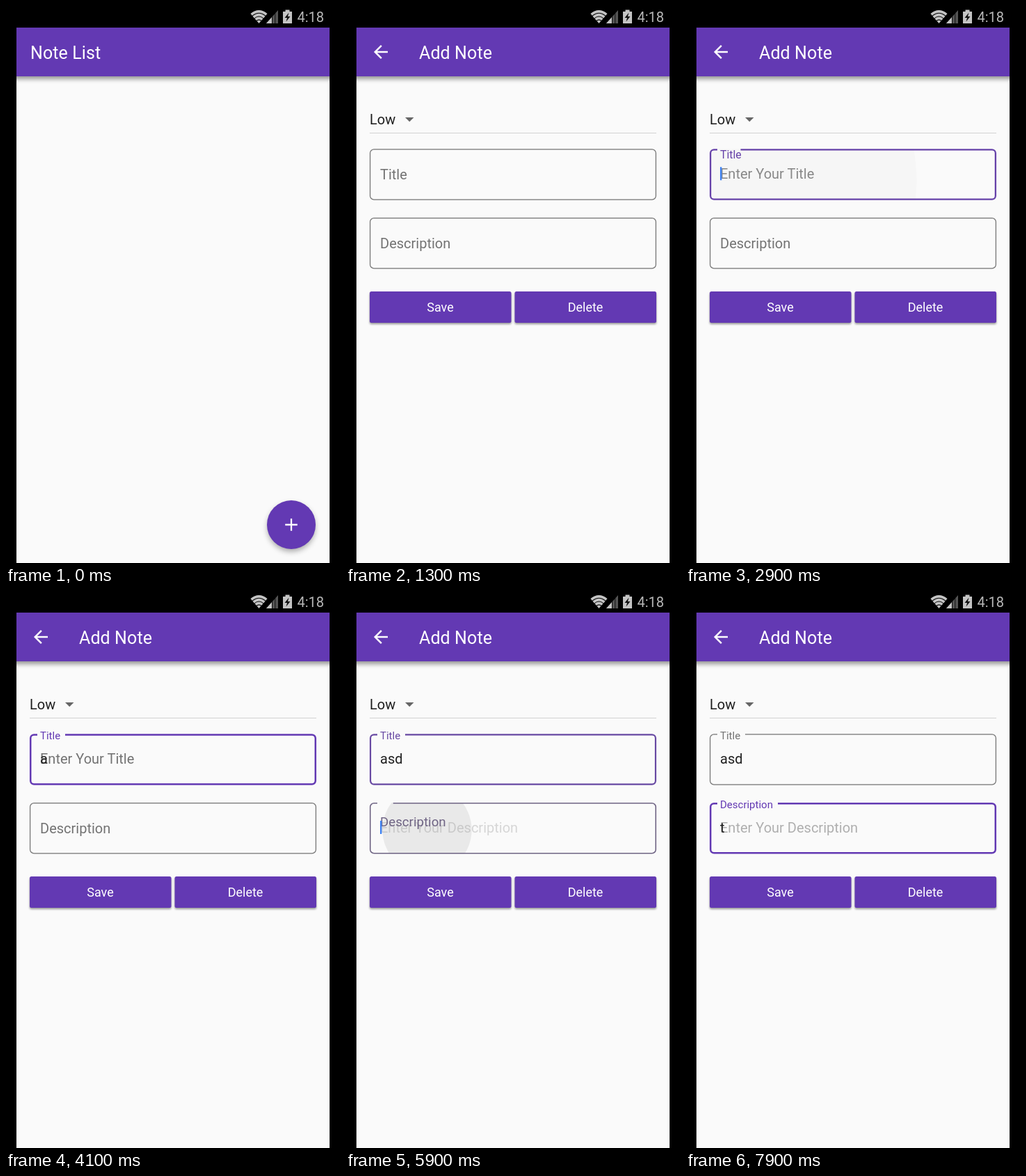
Write an HTML page that moves like this. It is 480x800 px and loops after 8000 ms.

```html
<!DOCTYPE html>
<html lang="en">
<head>
<meta charset="utf-8">
<title>Note form</title>
<style>
  html, body { margin: 0; width: 100%; height: 100%; overflow: hidden; background: #000; }
  svg { display: block; width: 480px; height: 800px; font: 20px Roboto, sans-serif; }
  .bar { font-size: 25px; letter-spacing: .1px; fill: #fff; }
  .btn { font-size: 18px; fill: #fff; text-anchor: middle; }
  .main { fill: #6339b3; }
  .ink { fill: #1f1f1f; }
  .hint { fill: #737373; }
  .cursor { fill: #4285f4; }
</style>
</head>
<body>
<svg viewBox="0 0 480 800" xmlns="http://www.w3.org/2000/svg">
  <defs>
    <filter id="soft" x="-20%" y="-50%" width="140%" height="200%"><feGaussianBlur stdDeviation="3"/></filter>
    <filter id="thin" x="-20%" y="-50%" width="140%" height="200%"><feGaussianBlur stdDeviation="1.5"/></filter>
    <filter id="wide" x="-50%" y="-50%" width="200%" height="200%"><feGaussianBlur stdDeviation="4.5"/></filter>
    <clipPath id="disc"><circle cx="410" cy="745" r="35"/></clipPath>
    <clipPath id="screen"><rect x="15" y="31" width="450" height="769"/></clipPath>
  </defs>
  <rect width="480" height="800"/>

  <!-- status bar -->
  <path d="M352.6 12.4Q363.5 3.4 374.4 12.4M355.6 16Q363.5 9.4 371.4 16M358.6 19.4Q363.5 15.4 368.4 19.4"
    fill="none" stroke="#c4c4c4" stroke-width="3.6"/>
  <path d="M360.6 21.6Q363.5 19.4 366.4 21.6L363.5 25Z" fill="#c4c4c4"/>
  <path d="M391 6V25H374Z" fill="#545454"/>
  <path d="M382 16V25H374Z" fill="#c4c4c4"/>
  <path d="M382.5 14V25M386.8 10V25" stroke="#000" stroke-width=".8"/>
  <path d="M398 8H401.5V5.5H407.5V8H411V25H398Z" fill="#c4c4c4"/>
  <path d="M406.5 9.5L400.5 17H404L402.5 22.5L408.5 15H405Z" fill="#111"/>
  <text x="418.5" y="23" fill="#b8b8b8">4:18</text>

  <g clip-path="url(#screen)">
    <rect x="15" y="31" width="450" height="769" fill="#fafafa"/>
    <rect x="5" y="38" width="470" height="67" opacity=".4" filter="url(#soft)"/>
    <rect class="main" x="15" y="31" width="450" height="70"/>

    <g id="list">
      <text class="bar" x="35" y="76">Note List</text>
      <circle id="fabShadow" cx="410" r="34" opacity=".36" filter="url(#wide)"/>
      <circle class="main" cx="410" cy="745" r="35"/>
      <g id="press" clip-path="url(#disc)" fill="#fff">
        <circle cx="410" cy="745" r="35" opacity=".05"/>
        <circle cx="440" cy="751.5" r="3" opacity=".35"/>
      </g>
      <path d="M401.25 745H418.75M410 736.25V753.75" stroke="#fff" stroke-width="2.3"/>
    </g>

    <g id="form">
      <path transform="translate(35 51) scale(1.25)" fill="#fff"
        d="M20 11H7.83l5.59-5.59L12 4l-8 8 8 8 1.41-1.41L7.83 13H20z"/>
      <text class="bar" x="105" y="76">Add Note</text>
      <text class="ink" x="34" y="170">Low</text>
      <path d="M85 160H97.5L91.25 166.25Z" fill="#666"/>
      <path d="M34 182.5H446" stroke="#d2d2d2"/>
      <g id="fields"></g>
      <g id="buttons"></g>
    </g>
  </g>
</svg>
<script>
const LOOP = 8000, STEP = 200, HEIGHT = 73.5;
const GREY = [115, 115, 115], PURPLE = [99, 57, 179];
const $ = id => document.getElementById(id);

function el(parent, tag, attrs = {}, text = '') {
  const node = document.createElementNS('http://www.w3.org/2000/svg', tag);
  set(node, attrs);
  node.textContent = text;
  return parent.appendChild(node);
}
function set(node, attrs) {
  for (const k in attrs) node.setAttribute(k, attrs[k]);
}
const clamp = u => Math.min(1, Math.max(0, u));
const mix = (a, b, p) => a + (b - a) * p;
const tint = p => `rgb(${GREY.map((c, i) => Math.round(mix(c, PURPLE[i], p)))})`;

// Eased progress after a tap, with a short delay
function ease(ms) {
  const u = clamp((ms - 180) / 600);
  return u * u * u * (u * (6 * u - 15) + 10);
}

function outline(y, gapEnd, w) {
  const h = w / 2, l = 34 + h, r = 446 - h, b = y + HEIGHT - h, top = y + h, c = 6.25 - h;
  const arc = (x, z) => `A${c} ${c} 0 0 1 ${x} ${z}`;
  return `M${gapEnd} ${top}H${r - c}${arc(r, top + c)}V${b - c}${arc(r - c, b)}` +
    `H${l + c}${arc(l, b - c)}V${top + c}${arc(l + c, top)}H45`;
}

const fields = [
  { name: 'Title', y: 205.25, gap: 40, cx: 100, cy: 250,
    tap: 2300, leave: 5500, type: 4100, text: 'asd', fade: 4300 },
  { name: 'Description', y: 304, gap: 87, cx: 116.5, cy: 343,
    tap: 5500, leave: LOOP, type: 7900, text: 't', fade: 7720 }
];

function buildField(f, i) {
  const g = el($('fields'), 'g');
  const clip = el(g, 'clipPath', { id: 'clip' + i });
  el(clip, 'rect', { x: 34, y: f.y, width: 412, height: HEIGHT, rx: 6.25 });
  f.splash = el(el(g, 'g', { 'clip-path': `url(#clip${i})` }), 'circle', { cx: f.cx, cy: f.cy });
  f.border = el(g, 'path', { fill: 'none' });
  const base = f.y + 42.5;
  f.prompt = el(g, 'text', { class: 'hint', x: 49, y: base }, 'Enter Your ' + f.name);
  f.label = el(g, 'text', { x: 49 }, f.name);
  f.value = el(g, 'text', { class: 'ink', x: 49, y: base });
  f.caret = el(g, 'rect', { class: 'cursor', y: f.y + 26, width: 2.4, height: 19 });
}

function drawField(f, t) {
  const p = ease(t - f.tap), focus = p - ease(t - f.leave);
  const w = mix(1.25, 2.5, focus);
  const typed = f.text.slice(0, Math.max(0, 1 + Math.floor((t - f.type) / 400)));
  const blinkOn = t >= f.tap && t < f.leave && (t - f.tap) % 2600 < 1600;

  set(f.splash, { r: Math.max(0, 291 * p - 12), opacity: .09 * (1 - p) });
  set(f.border, { d: outline(f.y, 45 + f.gap * p, w), stroke: tint(focus), 'stroke-width': w });
  set(f.prompt, { opacity: typed ? p * clamp(1 - (t - f.fade) / 400) : p });
  set(f.label, { y: f.y + mix(43.75, 7.75, p), 'font-size': mix(20, 15, p), fill: tint(focus) });
  if (f.value.textContent !== typed) f.value.textContent = typed;
  const end = typed ? f.value.getComputedTextLength() : 0;
  set(f.caret, { x: 49 + end, opacity: +blinkOn });
}

function buildButton(x, text) {
  const g = $('buttons'), box = { x, width: 203.5, height: 45, rx: 2.5 };
  el(g, 'rect', { ...box, y: 412, opacity: .4, filter: 'url(#thin)' });
  el(g, 'rect', { ...box, y: 410, class: 'main' });
  el(g, 'text', { class: 'btn', x: x + 101.5, y: 439 }, text);
}

function render(t) {
  const open = t >= 1300, pressed = t >= 1100;
  set($('list'), { display: open ? 'none' : 'inline' });
  set($('form'), { display: open ? 'inline' : 'none' });
  set($('press'), { opacity: +pressed });
  set($('fabShadow'), { cy: pressed ? 751 : 749 });
  fields.forEach(f => drawField(f, t));
}

fields.forEach(buildField);
buildButton(34, 'Save');
buildButton(242.5, 'Delete');

const start = performance.now();
function tick() {
  const t = (performance.now() - start) % LOOP;
  // The picture advances in whole steps, half a step off zero
  render(Math.floor(t / STEP - .5) * STEP + STEP / 2);
  requestAnimationFrame(tick);
}
tick();
</script>
</body>
</html>
```
